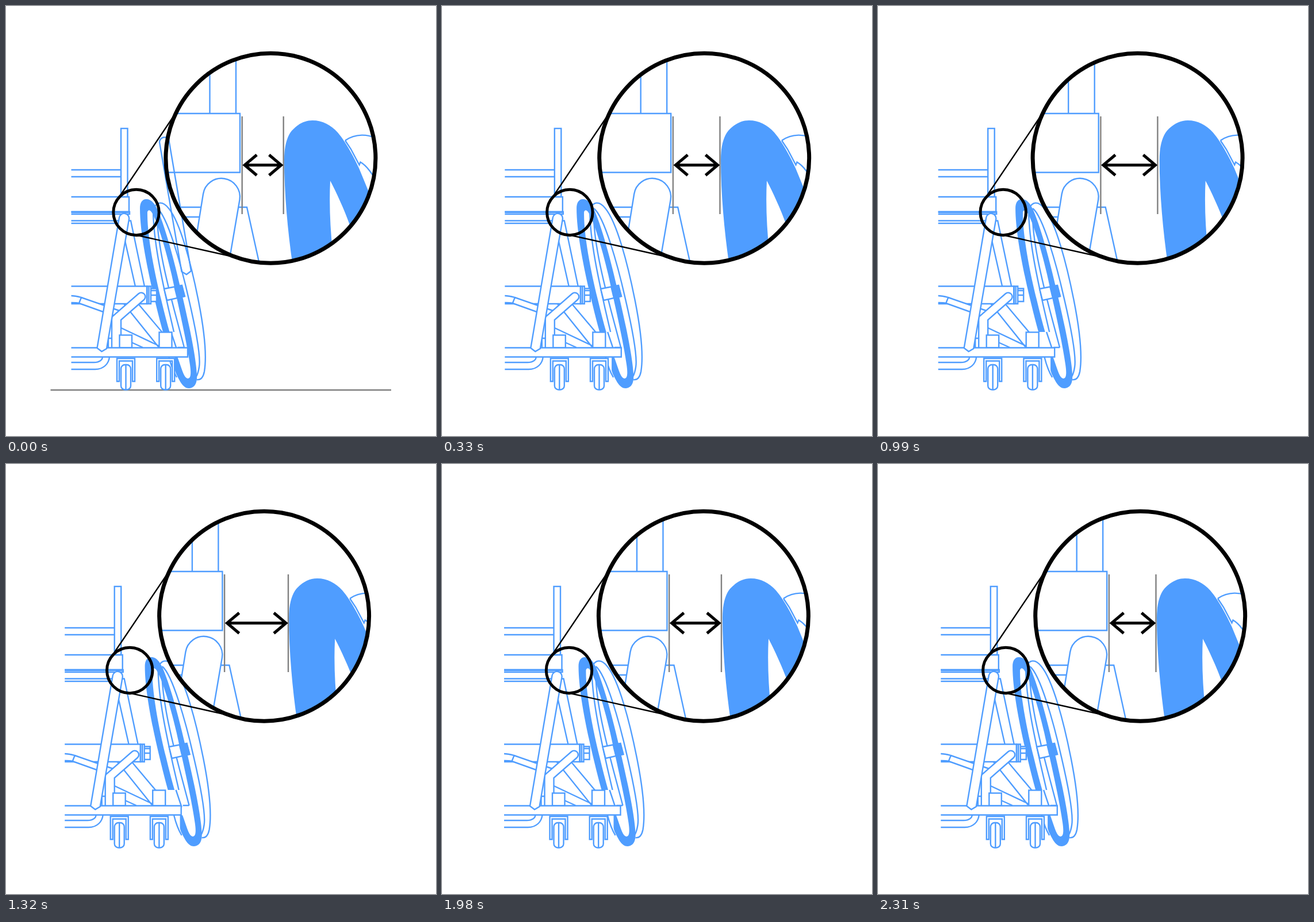
An HTML page that plays this animation: 748x748 px, repeating every 2.64 s.

```html
<!DOCTYPE html>
<html>
<head>
<meta charset="utf-8">
<style>
html, body { margin: 0; width: 100%; height: 100%; overflow: hidden; background: #fff; }
svg { display: block; width: 100vw; height: 100vh; }
.line { fill: none; stroke: #4f9dff; stroke-width: 2.4; }
.white { fill: #fff; }
.solid { fill: #4f9dff; stroke: none; }
.mask { fill: #fff; stroke: none; }
.gray { fill: none; stroke: #808080; stroke-width: 2.4; }
.black { fill: none; stroke: #000; }
</style>
</head>
<body>
<svg viewBox="0 0 748 748">
  <defs>
    <clipPath id="lens"><circle id="lensClip" cx="460.4" cy="264.7" r="182.5"/></clipPath>
    <g id="caster" class="line white">
      <path d="M193 653V613H224V653H220V617.5H197V653Z"/>
      <rect x="200" y="624" width="17" height="43.5" rx="7"/>
      <path d="M208.5 624V667"/>
    </g>
  </defs>

  <path id="ground" class="gray" d="M77.5 668H670"/>

  <g id="wheel" class="line">
    <!-- hand rim -->
    <path d="M257 352C262 341 272 338 283 352C303 376 322 448 335 514C346 570 349 612 345 636C343 646 339 651 332 650"/>
    <path d="M263 352C281 366 304 448 318 510C331 566 339 610 336 628C334 640 331 647 327 648"/>
    <path d="M256 358C257 410 270 470 283 528L299 597"/>
    <path d="M263 372C265 420 280 480 293 530L310 594"/>
    <!-- tire -->
    <path class="solid" fill-rule="evenodd" d="M233 352C233 342 237 336 244 336C252 336 258 342 264 355C284 402 304 490 319 559C327 597 333 634 332 649C331 660 325 665 318 665C308 665 302 652 296 640C286 612 277 583 270 556C254 495 233 406 233 352ZM246 358C245 398 259 468 270 511C280 553 290 588 301 618C307 635 310 647 316 648C322 648 322 638 320 624C314 582 300 522 288 467C276 415 260 366 252 357Q248 353 246 358Z"/>
    <path class="mask" d="M262 567H301V611H294V638L280 611Z"/>
    <path d="M283.5 611C287 625 291 636 297 646M287 567L297 597M299 594H310"/>
    <path class="white" d="M275 492L306 486L311 505L280 512Z"/>
    <path class="solid" d="M292 488.5L306.5 485L312 505.5L297 509Z"/>
  </g>

  <g id="chair" class="line">
    <path d="M113.500 285H200M113.500 297H200"/>
    <rect class="white" x="200" y="213" width="11.5" height="119"/>
    <path d="M113.500 332H214V358M113.500 358H215V362H113.500M113.500 373.500H197M113.500 378H196"/>
    <path stroke-width="3.4" d="M113.500 358.500H214"/>
    <path d="M212 373.500H217L241 488M206 404L225 488"/>
    <path class="white" d="M113.500 487.500H245V518H113.500"/>
    <path class="white" d="M245.500 487.500H248.500V518H245.500ZM248.500 487.500H252V518H248.500ZM252 491.500H262V514H252ZM252 495H262M252 503H262"/>
    <path d="M205 518L266 594M230 518L278 575M196 558L272 594M218 585L238 594M178 594V578H185"/>
    <path class="white" d="M113.500 504C121 504 124 505 131 507L200 531L194 541L127 517C122 516 119 516 113.500 516M131 507L127 517"/>
    <path class="white" d="M184 594V541L230.500 500.500A7 7 0 0 1 240 511L200 546V594"/>
    <path d="M113.500 620H153C162 620 168 616 168 610M113.500 632H155C170 632 179 622 180 610"/>
    <rect class="white" x="197.500" y="572.500" width="21.500" height="22"/>
    <rect class="white" x="266.500" y="567.500" width="22" height="27"/>
    <path class="white" d="M113.500 594.500H316V610.500H113.500"/>
    <use href="#caster"/>
    <use href="#caster" x="69.2"/>
    <path class="white" d="M197 368A8.500 8.500 0 0 1 214 371L175 596L166.500 601L158.500 595Z"/>
  </g>

  <g clip-path="url(#lens)">
    <rect width="748" height="748" fill="#fff"/>
    <g id="bigChair" class="line">
      <path d="M354.500 70V187M400 70V187M270 187H407V289.500H270"/>
      <path d="M270 350H345M270 367H340M400 350H419L440 445"/>
      <path class="white" d="M324 445L343 327A32 32 0 0 1 406.500 337L388 445"/>
    </g>
    <g id="bigWheel" class="line">
      <path d="M590 234C607 222 630 221 652 234M590 234L600 249L614.500 276.500L616.500 271.500C628 278 637 292 648 310"/>
      <path class="solid" d="M484 268C484 246 488 228 497 217C507 206 519 199 533 199C551 199 565 207 577 220C590 235 603 259 614 282L642 350L620 430L598 381C588 353 574 323 564 304C562 345 564 385 568 425V460H500C491 400 484 330 484 268Z"/>
    </g>
  </g>

  <path id="stray" class="line" d="M267 237A8.500 8.500 0 0 1 283.500 234L322 461L314 467L305.500 462Z"/>
  <path id="marks" class="gray"/>
  <path id="arrow" class="black" stroke-width="5"/>

  <g id="frame" class="black">
    <path stroke-width="2.4" d="M199 329L292 191M231 399.500L392 435.500"/>
    <circle cx="226.500" cy="359" r="39.700" stroke-width="5"/>
    <circle cx="460.400" cy="264.700" r="182.500" stroke-width="7"/>
  </g>
</svg>
<script>
const $ = id => document.getElementById(id);
const shift = (id, x) => $(id).setAttribute('transform', `translate(${x})`);

// Per pose: chair shift, magnified chair shift, wheel shift, magnified wheel shift, right mark
const poses = [
  [0, 0, 0, 0, 482.7],
  [-4.2, -8.8, 1.1, 1, 483.5],
  [-5.5, -15.5, 4.5, 4, 486],
  [-8.8, -23.3, 6.1, 5.7, 486.4],
  [-11.3, -30.6, 8.6, 8.2, 491]
];
const STEP = 330, COUNT = 8;
let shown = -1;

function show(index) {
  const [chair, bigChair, wheel, bigWheel, right] = poses[index];
  const left = 410.7 + bigChair, a = left + 4.5, b = right - 4;
  shift('chair', chair);
  shift('frame', chair);
  shift('lensClip', chair);
  shift('bigChair', bigChair);
  shift('wheel', wheel);
  shift('bigWheel', bigWheel);
  $('marks').setAttribute('d', `M${left} 192V362M${right} 192V362`);
  $('arrow').setAttribute('d',
    `M${a} 276.700H${b}M${a + 21} 259L${a} 276.700L${a + 21} 294.500M${b - 21} 259L${b} 276.700L${b - 21} 294.500`);
  for (const id of ['ground', 'stray'])
    $(id).style.display = index ? 'none' : '';
}

function tick() {
  const step = Math.floor(performance.now() / STEP) % COUNT;
  const index = Math.min(step, COUNT - step);
  if (index !== shown) show(shown = index);
  requestAnimationFrame(tick);
}
tick();
</script>
</body>
</html>
```
